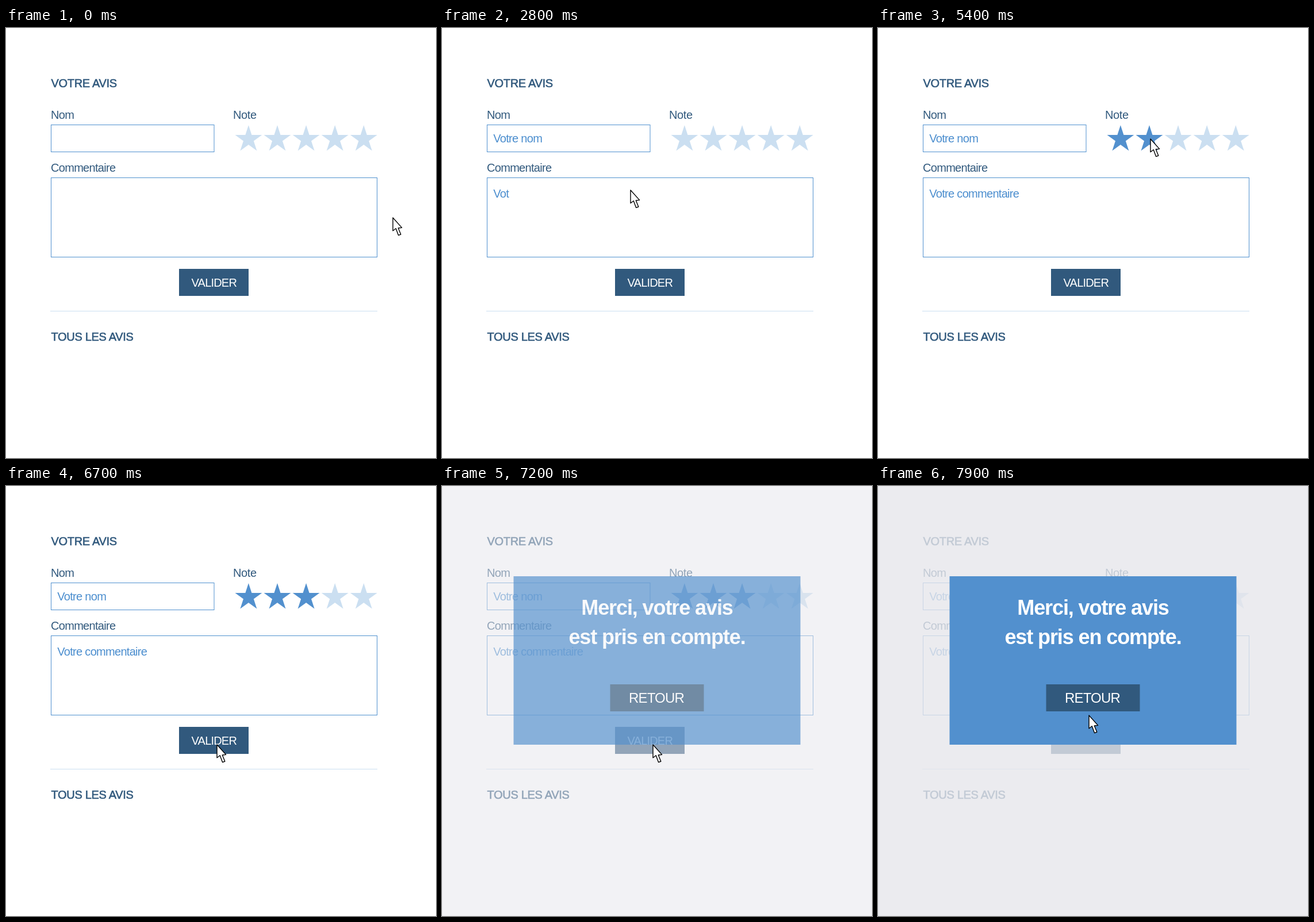
Animation, 748 px wide and 748 px high, one loop 8 s. Source, as an HTML page:

```html
<!DOCTYPE html>
<html lang="fr">
<head>
<meta charset="utf-8">
<title>Votre avis</title>
<style>
  html, body { margin: 0; height: 100%; overflow: hidden; background: #fff; }
  svg { display: block; width: 100%; height: 100%; }
  text { font: 20px "Liberation Sans", Arial, sans-serif; letter-spacing: -.7px; fill: #31597d; }
  .title { letter-spacing: -.32px; stroke: #31597d; stroke-width: .6; }
  .typed { fill: #4a8dce; }
  .field { fill: #fff; stroke: #5091cf; }
  .button { fill: #31597d; }
  .label { fill: #fff; letter-spacing: -.8px; text-anchor: middle; }
  .back { font-size: 24px; }
  .thanks { font-size: 36px; font-weight: bold; letter-spacing: -1.1px; }
</style>
</head>
<body>
<svg viewBox="0 0 748 748">
  <text class="title" x="78.5" y="103">VOTRE AVIS</text>
  <text x="78" y="158">Nom</text>
  <text x="395" y="158" style="letter-spacing:-.4px">Note</text>
  <rect class="field" x="78.5" y="168.5" width="283.5" height="47"/>
  <text class="typed" id="name" x="89.3" y="199"></text>
  <g id="stars"></g>
  <text x="78" y="250">Commentaire</text>
  <rect class="field" x="78.5" y="260.5" width="567" height="138"/>
  <text class="typed" id="comment" x="89.3" y="295"></text>
  <rect class="button" x="301" y="419" width="121" height="47"/>
  <text class="label" x="361.8" y="450">VALIDER</text>
  <rect x="77" y="492" width="569" height="1" fill="#cbdff1"/>
  <text class="title" x="78.5" y="544">TOUS LES AVIS</text>

  <rect id="veil" width="748" height="748" fill="#e7e7ec"/>
  <g id="panel">
    <rect x="124.5" y="157" width="499" height="293" fill="#5290ce"/>
    <text class="label thanks" x="374" y="224">Merci, votre avis</text>
    <text class="label thanks" x="374" y="275">est pris en compte.</text>
    <rect class="button" x="292.5" y="345" width="163" height="47"/>
    <text class="label back" x="373" y="377">RETOUR</text>
  </g>
  <path id="cursor" d="M1 1V23.8L6.2 19.8L10.6 31.6L14.8 30L10.3 19L16.6 18.4Z"
        fill="#fff" stroke="#000" stroke-width="1.4" stroke-linejoin="round"/>
</svg>
<script>
const LOOP = 8000, TICK = 100;
const $ = id => document.getElementById(id);

// start time, number of ticks, destination x, y
const moves = [
  [100, 6, 327, 204],
  [2000, 6, 327, 281],
  [4600, 6, 421, 192],
  [5300, 2, 473, 192],
  [5600, 2, 522, 192],
  [6200, 6, 366, 449],
  [7600, 4, 366, 398]
];
const litAt = [5100, 5400, 5700];

function starPath(cx, cy, radius) {
  const points = Array.from({ length: 10 }, (_, i) => {
    const r = i % 2 ? radius * .382 : radius, a = i * Math.PI / 5;
    return `${cx + r * Math.sin(a)},${cy - r * Math.cos(a)}`;
  });
  return `M${points.join("L")}Z`;
}

const stars = Array.from({ length: 5 }, (_, i) => {
  const star = document.createElementNS("http://www.w3.org/2000/svg", "path");
  star.setAttribute("d", starPath(421.9 + 50.1 * i, 193.7, 24.6));
  return $("stars").appendChild(star);
});

// Ticks elapsed since start, the first one counting at once
const ticks = (t, start, max) =>
  Math.min(max, Math.max(0, Math.floor((t - start) / TICK) + 1));

function cursorAt(t) {
  let x = 672, y = 329;
  for (const [start, n, toX, toY] of moves) {
    const p = ticks(t, start, n) / n;
    x += (toX - x) * p;
    y += (toY - y) * p;
  }
  return `translate(${x} ${y})`;
}

function draw(t) {
  $("name").textContent = "Votre nom".slice(0, ticks(t, 1100, 9));
  const typed = ticks(t, 2600, 16);
  // the space comes together with the next letter
  $("comment").textContent = "Votre commentaire".slice(0, typed > 5 ? typed + 1 : typed);
  stars.forEach((star, i) =>
    star.setAttribute("fill", t >= litAt[i] ? "#5290ce" : "#cbdff1"));
  const fade = ticks(t, 6900, 6) / 6;
  $("veil").setAttribute("opacity", fade * .8);
  $("panel").setAttribute("opacity", fade);
  $("cursor").setAttribute("transform", cursorAt(t));
}

function frame() {
  draw(performance.now() % LOOP);
  requestAnimationFrame(frame);
}
frame();
</script>
</body>
</html>
```
